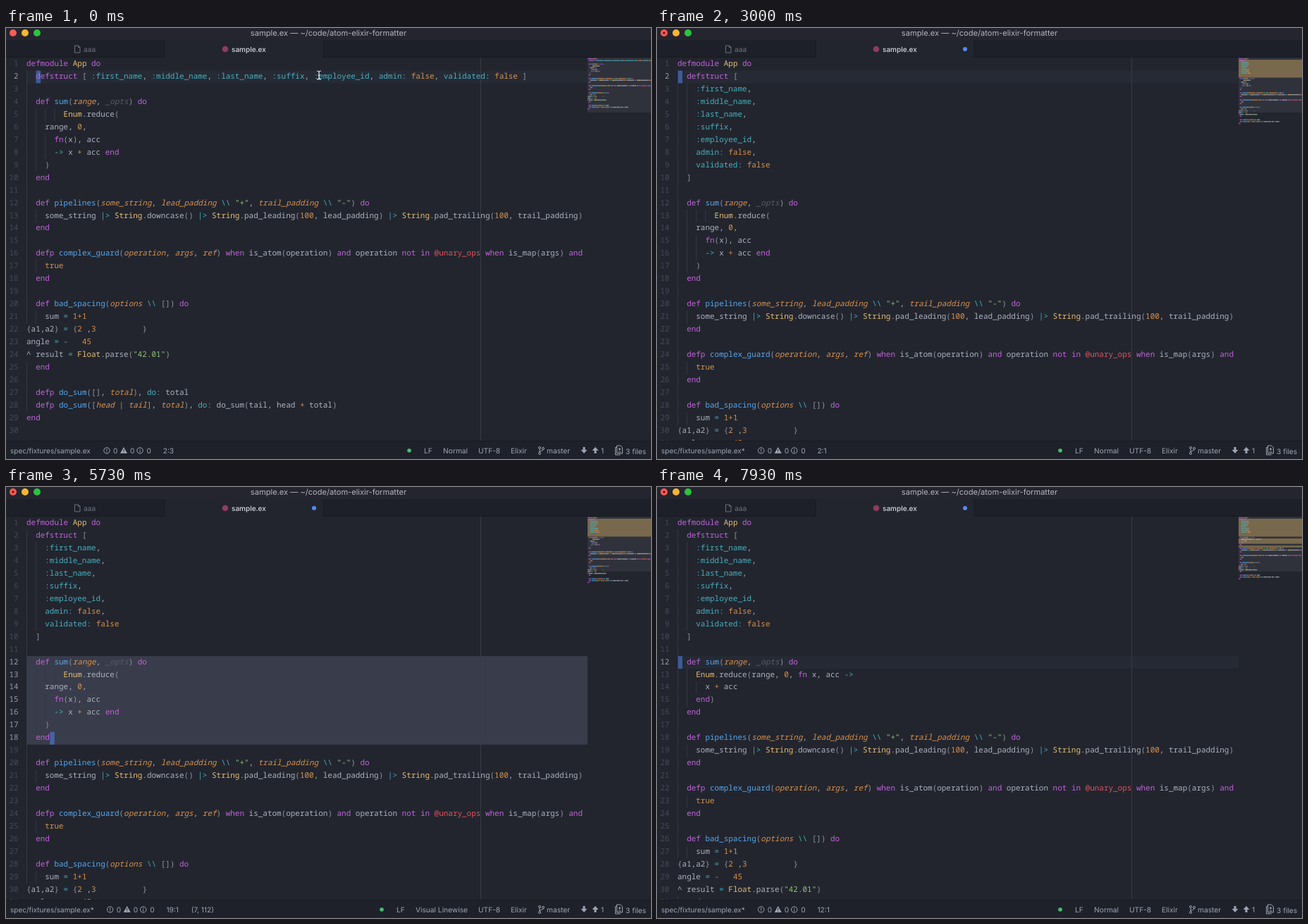
An HTML page that plays this animation: 915 by 612 pixels, repeating every 8 s.

```html
<!DOCTYPE html>
<html lang="en">
<head>
<meta charset="utf-8">
<title>sample.ex</title>
<style>
html, body { margin: 0; width: 100%; height: 100%; overflow: hidden; background: #22252e; }
svg { display: block; width: 915px; height: 612px; text-rendering: geometricPrecision; }
text { white-space: pre; }
.ui { font: 10.2px Inter, sans-serif; fill: #9da5b4; }
.code { font: 10.96px "Noto Sans Mono", monospace; }
.plain { fill: #abb2bf; }
.str { fill: #90c274; }
.kw { fill: #c063da; }
.atom { fill: #46b0bf; }
.op { fill: #46b0bf; }
.num { fill: #d8914b; }
.mod { fill: #e5bd72; }
.attr { fill: #e0525c; }
.punct { fill: #8d939f; }
.fn { fill: #56a8ee; }
.param { fill: #d8914b; font-style: italic; }
.unused { fill: #575c68; font-style: italic; }
.lineno { fill: #464a56; text-anchor: end; }
.lineno.on { fill: #959ba8; }
.guide { fill: #343843; }
.icon { fill: none; stroke: #9da5b4; stroke-width: 1; }
.solid { fill: #9da5b4; }
</style>
</head>
<body>
<svg viewBox="0 0 915 612">
  <rect width="915" height="612" fill="#22252e"/>
  <g id="editor" class="code"></g>

  <rect width="915" height="17" fill="#24252f"/>
  <circle cx="10" cy="7" r="5" fill="#fc5b54"/>
  <circle cx="27" cy="7" r="5" fill="#f6b62f"/>
  <circle cx="44" cy="7" r="5" fill="#2ac440"/>
  <text class="ui" x="457.5" y="11" text-anchor="middle" style="font-size:11.1px;fill:#b4b5bd">sample.ex — ~/code/atom-elixir-formatter</text>

  <rect y="17" width="915" height="25" fill="#1d2028"/>
  <rect y="41" width="915" height="1" fill="#181a21"/>
  <rect x="225" y="17" width="225" height="25" fill="#22252e"/>
  <path d="M225 17v25M450 17v25" stroke="#181a21"/>
  <path class="icon" d="M97.500 25h5l2.500 2.500v7.500h-7.500zM102.500 25v2.500h2.500" style="stroke:#6b717d"/>
  <text class="ui" x="110" y="33.500" style="fill:#6b717d">aaa</text>
  <circle cx="311" cy="30" r="4.300" fill="#8d3d5f"/>
  <text class="ui" x="320" y="33.500" style="fill:#d7dae0;font-weight:500;font-size:10px">sample.ex</text>

  <rect y="586" width="915" height="26" fill="#1e2129"/>
  <rect y="586" width="915" height="1" fill="#181a21"/>
  <g id="status" class="ui"></g>
  <g class="ui">
    <text x="670" y="603.500">UTF-8</text>
    <text x="716" y="603.500">Elixir</text>
    <g class="icon">
      <circle cx="757" cy="596" r="1.500"/><circle cx="757" cy="604" r="1.500"/><circle cx="762" cy="597" r="1.500"/>
      <path d="M757 597.500v5M762 598.500c0 2.500-5 1.500-5 4"/>
      <path d="M866.500 595.500h-2v10.500h7M866.500 593h5l3 3v8h-8zM868.500 598h4M870.500 596v4M868.500 602h4"/>
    </g>
    <text x="767" y="603.500">master</text>
    <path class="solid" d="M818.500 595h3v4h3l-4.500 5-4.500-5h3zM834.500 604h3v-4h3l-4.500-5-4.500 5h3z"/>
    <text x="844" y="603.500">1</text>
    <text x="879" y="604.500">3 files</text>
  </g>
  <g id="marks">
    <circle cx="10" cy="7" r="1.800" fill="#7c110e"/>
    <circle cx="437" cy="30" r="3" fill="#568af2"/>
  </g>
  <path id="pointer" d="M441 61q3 0 3 2v8q0 2-3 2M447 61q-3 0-3 2v8q0 2 3 2M442.500 67h3" fill="none" stroke="#e8e8ec" stroke-width="1.200"/>
</svg>
<script>
const LOOP = 8000;
const LEFT = 29, TOP = 42.5, ROW = 17.96, BASELINE = 11.5, CHAR = 6.575, RIGHT = 825;
const MAP_TOP = 42, MAP_ROW = 2.55, MAP_CHAR = 0.865;

const head = ['defmodule App do'];
const structLine = ['  defstruct [ :first_name, :middle_name, :last_name, :suffix, :employee_id, admin: false, validated: false ]'];
const structBlock = `  defstruct [
    :first_name,
    :middle_name,
    :last_name,
    :suffix,
    :employee_id,
    admin: false,
    validated: false
  ]`.split('\n');
const sumRough = `
  def sum(range, _opts) do
        Enum.reduce(
    range, 0,
      fn(x), acc
      -> x + acc end
    )
  end`.split('\n');
const sumTidy = `
  def sum(range, _opts) do
    Enum.reduce(range, 0, fn x, acc ->
      x + acc
    end)
  end`.split('\n');
const rest = String.raw`
  def pipelines(some_string, lead_padding \\ "+", trail_padding \\ "-") do
    some_string |> String.downcase() |> String.pad_leading(100, lead_padding) |> String.pad_trailing(100, trail_padding)
  end

  defp complex_guard(operation, args, ref) when is_atom(operation) and operation not in @unary_ops when is_map(args) and
    true
  end

  def bad_spacing(options \\ []) do
    sum = 1+1
{a1,a2} = {2 ,3          }
angle = -   45
^ result = Float.parse("42.01")
  end

  defp do_sum([], total), do: total
  defp do_sum([head | tail], total), do: do_sum(tail, head + total)
end
`.split('\n');

const documents = [
  [...head, ...structLine, ...sumRough, ...rest],
  [...head, ...structBlock, ...sumRough, ...rest],
  [...head, ...structBlock, ...sumTidy, ...rest],
];

const TOKEN = /("[^"]*")|(\b(?:defmodule|defstruct|defp?|do|end|fn|when|and|not|in)\b(?!:))|(:\w+|\w+:)|((?:true|false|\d+)\b)|([A-Z]\w*)|(@\w+)|(\|>|->|\\\\|[=|-])|(\+)|([\[\](){}])|(\w+)|([^\s\w])/g;
const KINDS = ['str', 'kw', 'atom', 'num', 'mod', 'attr', 'op', 'num', 'punct', 'word', 'plain'];

function tokenize(line) {
  let place = '';
  return [...line.matchAll(TOKEN)].map(match => {
    const text = match[0];
    let kind = KINDS[match.slice(1).findIndex(group => group !== undefined)];
    if (/^defp?$/.test(text)) place = 'name';
    else if (text === ')') place = '';
    else if (kind === 'word') {
      kind = 'plain';
      if (place === 'name') { kind = 'fn'; place = 'params'; }
      else if (place === 'params') kind = text[0] === '_' ? 'unused' : 'param';
    }
    return { text, kind, col: match.index };
  });
}

const rect = (x, y, w, h, attrs) => `<rect x="${x}" y="${y}" width="${w}" height="${h}" ${attrs}/>`;
const label = (x, y, text, attrs = '') => `<text x="${x}" y="${y}" ${attrs}>${text}</text>`;
const rowTop = number => TOP + (number - 1) * ROW;

function indentOf(lines, i) {
  const own = j => (lines[j] || '').search(/\S|$/);
  return lines[i] ? own(i) : Math.max(own(i - 1), own(i + 1));
}

function drawText(lines, first, last) {
  return lines.slice(0, 31).map((line, i) => {
    const y = rowTop(i + 1), number = i + 1;
    let out = label(17.6, y + BASELINE, number, `class="lineno ${number >= first && number <= last ? 'on' : ''}"`);
    for (let col = 0; col < indentOf(lines, i); col += 2)
      out += rect(LEFT + col * CHAR, y, 1, ROW, 'class="guide"');
    for (const { text, kind, col } of tokenize(line))
      out += label(LEFT + col * CHAR, y + BASELINE, text, `class="${kind}"`);
    return out;
  }).join('');
}

function drawMinimap(lines, changed) {
  const y = i => MAP_TOP + 0.4 + i * MAP_ROW;
  let out = rect(RIGHT, MAP_TOP, 90, 78, 'fill="#2f323b"');
  for (const [from, to] of changed)
    out += rect(RIGHT, y(from - 1), 90, (to - from + 1) * MAP_ROW, 'fill="#78684c"');
  lines.forEach((line, i) => {
    for (const { text, kind, col } of tokenize(line))
      out += rect(RIGHT + col * MAP_CHAR, y(i) + 0.5, text.length * MAP_CHAR, 1.5, `class="${kind}" opacity=".7"`);
  });
  return out;
}

function drawEditor({ doc, line, col, selection, changed }) {
  const lines = documents[doc];
  const [first, last] = selection || [line, line];
  const band = rect(LEFT, rowTop(first), RIGHT - LEFT, (last - first + 1) * ROW, `fill="${selection ? '#393c4a' : '#262a34'}"`);
  const cursorCol = selection ? lines[last - 1].length : col - 1;
  const cursor = rect(LEFT + 0.4 + cursorCol * CHAR, rowTop(last), CHAR, ROW, 'fill="#528bff" opacity=".5"');
  return band + rect(673, MAP_TOP, 1, 544, 'fill="#383b45"') + cursor +
    drawText(lines, first, last) + drawMinimap(lines, changed);
}

function drawStatus({ doc, line, col, selection, modified }) {
  const y = 603.5, dx = modified ? 4.7 : 0, back = selection ? -39 : 0;
  const ring = (x, path) => `<g class="icon"><circle cx="${x}" cy="600" r="4.2"/><path d="M${x} ${path}"/></g>`;
  let out = label(6, y, 'spec/fixtures/sample.ex' + (modified ? '*' : ''), 'style="font-size:10px"');
  out += `<g transform="translate(${dx})">` +
    ring(143, '597.500v3m0 1v1.200') + label(152, y, 0) +
    '<path class="solid" d="M167 595l5 9h-10z"/><path d="M167 598v3m0 1v1" stroke="#1e2129"/>' + label(176, y, 0) +
    ring(190, '597.500v1.200m0 1v3') + label(199.5, y, 0);
  if (selection) {
    const [first, last] = selection;
    const picked = documents[doc].slice(first - 1, last);
    const chars = picked.reduce((sum, text) => sum + text.length + 1, 0);
    const position = `${last + 1}:1`;
    out += label(222.7, y, position) +
      label(position.length > 3 ? 258 : 252.5, y, `(${picked.length}, ${chars})`);
  } else out += label(222.7, y, `${line}:${col}`);
  out += '</g>' + `<circle cx="${572 + back}" cy="600" r="2.800" fill="#46c06a"/>` + label(593 + back, y, 'LF') +
    label(655, y, selection ? 'Visual Linewise' : 'Normal', 'text-anchor="end"');
  return out;
}

// Count of key presses made by time t, one every `gap` ms from `start`.
const presses = (t, start, gap, max) => t < start ? 0 : Math.min(max, 1 + Math.floor((t - start) / gap));

function stateAt(t) {
  const doc = t < 1850 ? 0 : t < 5790 ? 1 : 2;
  const line = t >= 4830 ? 12 : 2 + presses(t, 3200, 125, 11);
  const selection = t >= 470 && t < 1850 ? [2, 2]
    : t >= 5000 && t < 5790 ? [12, 12 + presses(t, 5080, 90, 6)] : null;
  const changed = t < 2150 ? [] : t < 6040 ? [[2, 11]] : [[2, 11], [13, 15], [17, 17]];
  return { doc, line, col: doc ? 1 : 3, selection, changed, modified: t >= 2150, pointer: t < 470 };
}

const byId = id => document.getElementById(id);
let shown = '';
function frame() {
  const state = stateAt(performance.now() % LOOP);
  const key = JSON.stringify(state);
  if (key !== shown) {
    shown = key;
    byId('editor').innerHTML = drawEditor(state);
    byId('status').innerHTML = drawStatus(state);
    byId('marks').style.display = state.modified ? '' : 'none';
    byId('pointer').style.display = state.pointer ? '' : 'none';
  }
  requestAnimationFrame(frame);
}
frame();
</script>
</body>
</html>
```
